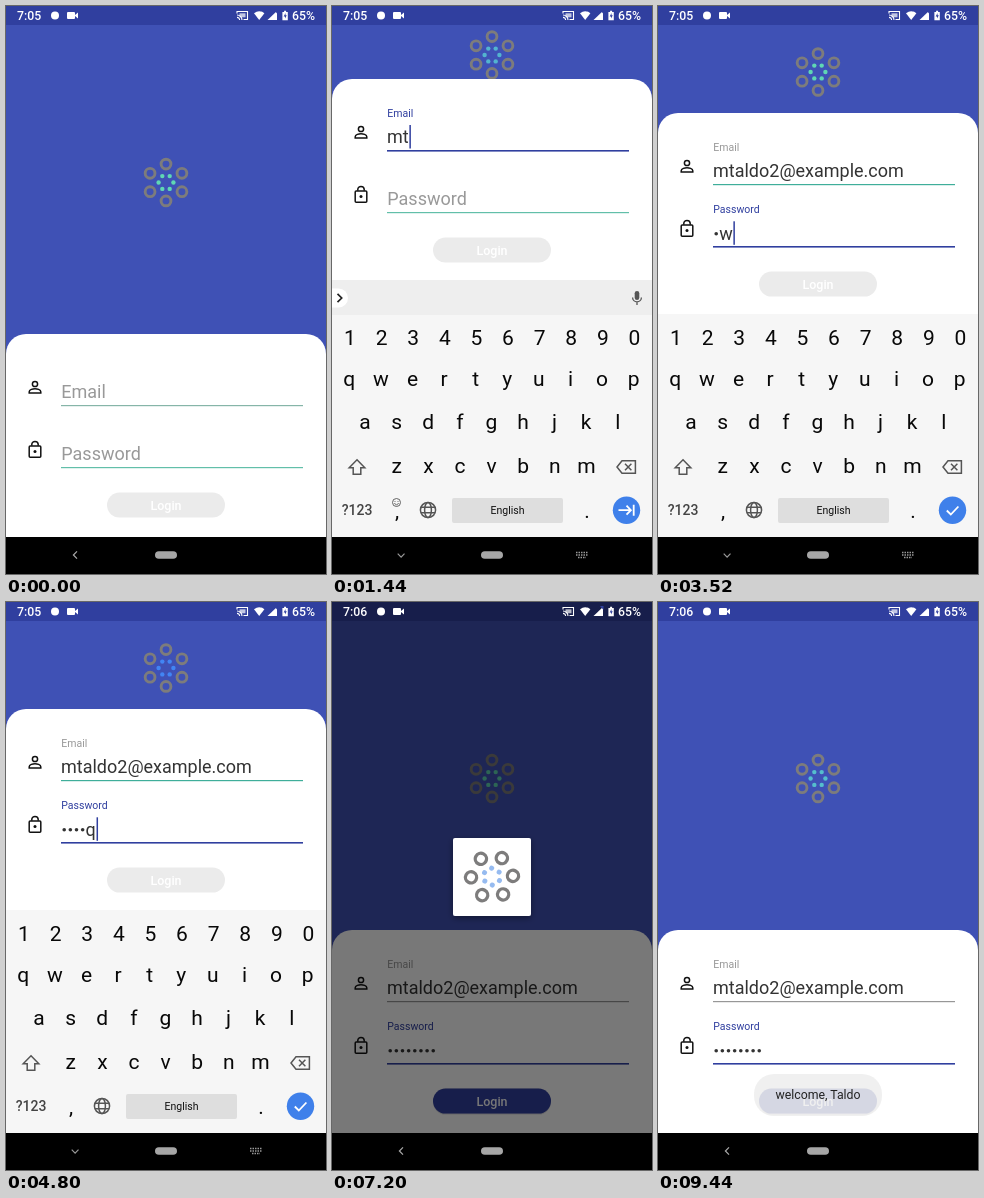
Animation, 320 px wide and 568 px high, one loop 9600 ms. Source, as an HTML page:

```html
<!DOCTYPE html>
<html lang="en">
<head>
<meta charset="utf-8">
<title>Login screen</title>
<style>
  html, body { margin: 0; width: 100%; height: 100%; overflow: hidden; background: #000; }
  svg { display: block; width: 320px; height: 568px; font-family: Roboto, "Noto Sans", sans-serif; }
  .mid { text-anchor: middle; }
  .bold { font-weight: 500; }
  .field { font-size: 18px; fill: #333; }
  .line { fill: none; stroke-linecap: butt; stroke-linejoin: miter; }
  .key { font-size: 21px; fill: #080808; text-anchor: middle; }
</style>
</head>
<body>
<svg viewBox="0 0 320 568">
  <defs>
    <g id="rings" fill="none" stroke="#7d7c7c" stroke-width="2.9"></g>
    <filter id="shadow" x="-30%" y="-30%" width="160%" height="170%">
      <feDropShadow dx="0" dy="2" stdDeviation="3" flood-opacity=".4"/>
    </filter>
    <filter id="lift" x="-10%" y="-20%" width="120%" height="160%">
      <feDropShadow dx="0" dy=".6" stdDeviation=".6" flood-opacity=".25"/>
    </filter>
  </defs>

  <rect width="320" height="568" fill="#3f51b5"/>
  <rect width="320" height="19" fill="#303f9f"/>
  <rect id="backing" y="270" width="320" height="298" fill="#f9f9f9"/>
  <g id="logo"><use href="#rings"/><g class="dots"></g></g>

  <g id="panel">
    <path d="M0 203V20A20 20 0 0 1 20 0H300A20 20 0 0 1 320 20V203Z" fill="#fff"/>
    <g class="line" stroke="#111" stroke-width="1.5">
      <circle cx="29" cy="50" r="2.6"/>
      <path d="M23.2 58.9v-1.2c0-2.2 3.9-3 5.8-3s5.8.8 5.8 3v1.2z"/>
      <rect x="23.2" y="112" width="11.6" height="11.2" rx="1"/>
      <path d="M25.8 111.8v-1.2a3.2 3.2 0 0 1 6.4 0v1.2"/>
    </g>
    <circle cx="29" cy="117.6" r="1.5" fill="#111"/>
    <text id="emailLabel" x="55.3">Email</text>
    <text id="email" class="field" x="55" y="64.3"></text>
    <rect id="emailLine" x="55" y="71" width="242"/>
    <text id="passLabel" x="55.3">Password</text>
    <g id="bullets" fill="#333"></g>
    <text id="lastChar" class="field" y="127"></text>
    <rect id="passLine" x="55" y="133" width="242"/>
    <rect id="caret" width="1.5" height="23.5" fill="#303f9f"/>
    <rect id="button" x="101" y="158.6" width="118" height="25" rx="12.5"/>
    <text class="mid bold" x="160" y="175.7" font-size="12.5" fill="#fff">Login</text>
  </g>

  <g id="toast">
    <rect x="96" y="472" width="128" height="42" rx="20" fill="#eee" fill-opacity=".87"/>
    <text class="mid" x="160" y="496.8" font-size="12.3" fill="#222">welcome, Taldo</text>
  </g>

  <rect id="scrim" width="320" height="532" fill="#000"/>

  <g fill="#fff">
    <text id="clock" class="bold" x="11" y="14" font-size="12.3"></text>
    <circle cx="49" cy="9.5" r="4"/>
    <rect x="61" y="6" width="8" height="7" rx="1"/>
    <path d="M69 9l3-2.5v6l-3-2.5z"/>
    <path d="M231 7.5v-2h10.5v8h-4" fill="none" stroke="#fff" stroke-width="1.1"/>
    <path d="M231 9a5 5 0 0 1 5 5M231 11.4a2.6 2.6 0 0 1 2.6 2.6" fill="none" stroke="#fff" stroke-width="1.1"/>
    <rect x="233.5" y="7.3" width="6" height="4" opacity=".7"/>
    <path d="M248 7.2q5.2-4 10.4 0l-5.2 6.8z"/>
    <path d="M271 5v9h-9.5z"/>
    <path d="M268 4h3.5v4z" fill="#303f9f"/>
    <path d="M276.4 6h1.7V4.7h2V6h1.7v8.2h-5.4z"/>
    <path d="M279.5 7l-1.8 3.4h1.3v2.2l1.8-3.4h-1.3z" fill="#303f9f"/>
    <text class="bold" x="286" y="14" font-size="12.3">65%</text>
  </g>

  <g id="dialog">
    <rect x="121" y="236" width="78" height="78" rx="2" fill="#fff" filter="url(#shadow)"/>
    <g id="spinner"><use href="#rings"/><g class="dots"></g></g>
  </g>

  <g id="keyboard">
    <rect y="308" width="320" height="262" fill="#f6f6f6"/>
    <g id="strip">
      <rect y="274" width="320" height="35" fill="#eee"/>
      <rect x="-8" y="282.5" width="24" height="19" rx="9.5" fill="#fff"/>
      <path class="line" d="M5.5 287.8l4.2 4.2-4.2 4.2" stroke="#222" stroke-width="1.7"/>
      <rect x="302.7" y="285" width="4.6" height="9" rx="2.3" fill="#555"/>
      <path class="line" d="M300.6 291.5a4.4 4.4 0 0 0 8.8 0M305 296v3" stroke="#555" stroke-width="1.3"/>
    </g>
    <g id="keys"></g>
    <g class="line" stroke="#555" stroke-width="1.5">
      <path d="M25 453.8l7.8 8h-4v6.4h-7.6v-6.4h-4z"/>
      <path d="M290 454.8h13.4v12.4H290l-5-6.2z"/>
      <path d="M293 457.8l6.4 6.4M299.4 457.8l-6.4 6.4"/>
      <circle cx="96" cy="504" r="7.6"/>
      <ellipse cx="96" cy="504" rx="3.4" ry="7.6"/>
      <path d="M89 501.2h14M89 506.8h14"/>
    </g>
    <text class="mid bold" x="25" y="509" font-size="14" fill="#444">?123</text>
    <g id="emoji" class="line" stroke="#555" stroke-width=".9">
      <circle cx="64.5" cy="496.5" r="4"/>
      <path d="M62.3 497.4q2.2 2.8 4.4 0M63 495v.9M66 495v.9"/>
    </g>
    <text class="key" x="65" y="512">,</text>
    <text class="key" x="255" y="512">.</text>
    <rect x="120" y="492" width="111" height="25" rx="2" fill="#dedede"/>
    <text class="mid" x="175.5" y="508" font-size="10.5" fill="#111">English</text>
    <circle cx="294.5" cy="504.2" r="13.7" fill="#3f80ea"/>
    <path id="enter" class="line" stroke="#fff" stroke-width="1.8"/>
  </g>
  <rect id="veil" y="270" width="320" height="261" fill="#f9f9f9"/>

  <rect id="navBar" y="531" width="320" height="37" fill="#000"/>
  <rect x="149" y="545.2" width="22" height="7.6" rx="3.8" fill="#fff" opacity=".65"/>
  <path id="back" class="line" d="M71 545.4l-3.6 3.6 3.6 3.6" stroke="#aaa" stroke-width="1.2"/>
  <g id="navKeys" class="line" stroke="#fff" stroke-opacity=".6">
    <path d="M65.7 547.7l3.4 3.4 3.4-3.4" stroke-width="1.2"/>
    <path d="M244 546.4h12M244 549h12M246 551.6h8" stroke-width="1.5" stroke-dasharray="1.5 1"/>
  </g>
</svg>

<script>
const LOOP = 9600, STEP = 160;
const EMAIL = "mtaldo2@example.com", PASSWORD = "qwerqwer";
const EMAIL_FOCUS = 320, KEYS_OPEN = 480, PASS_FOCUS = 2400, PLAIN_KEYS = 2720, KEYS_GONE = 6560;
const emailTyped = [[960, 1], [1280, 2], [1600, 3], [1920, EMAIL.length]];
const passTyped = [2880, 3360, 3840, 4320, 4640, 5040, 5360, 5680];
const REVEAL = 1500;
const BLUE = "#303f9f";
const DOT_COLORS = [
  [0, [95, 215, 180]], [240, [85, 190, 205]], [480, [150, 187, 240]],
  [720, [66, 133, 244]], [1120, [66, 133, 244]], [1680, [95, 215, 180]], [1840, [95, 215, 180]]
];

const $ = id => document.getElementById(id);
const set = (id, attrs) => { for (const k in attrs) $(id).setAttribute(k, attrs[k]); };
const show = (id, on) => set(id, { opacity: +on });
const mix = (a, b, p) => a + (b - a) * p;

function track(stops, t) {
  if (t <= stops[0][0]) return stops[0][1];
  for (let i = 1; i < stops.length; i++) {
    const [t0, a] = stops[i - 1], [t1, b] = stops[i];
    if (t < t1) return mix(a, b, (t - t0) / (t1 - t0));
  }
  return stops[stops.length - 1][1];
}

function dotColor(t) {
  t %= 1840;
  const part = c => Math.round(track(DOT_COLORS.map(([at, rgb]) => [at, rgb[c]]), t));
  return `rgb(${part(0)},${part(1)},${part(2)})`;
}

function hexagon(radius, start, r) {
  return Array.from({ length: 6 }, (_, i) => {
    const a = (start + i * 60) * Math.PI / 180;
    return `<circle cx="${radius * Math.cos(a)}" cy="${radius * Math.sin(a)}" r="${r}"/>`;
  }).join("");
}

function keyRow(chars, x, y) {
  return [...chars].map((c, i) => `<text class="key" x="${x + i * 31.6}" y="${y}">${c}</text>`).join("");
}

$("rings").innerHTML = hexagon(18.4, -90, 4.9);
document.querySelectorAll(".dots").forEach(g => g.innerHTML = hexagon(7.4, 0, 2.2));
$("keys").innerHTML = keyRow("1234567890", 18, 339.2) + keyRow("qwertyuiop", 17.3, 380) +
  keyRow("asdfghjkl", 33, 423.4) + keyRow("zxcvbnm", 64.8, 467);
$("bullets").innerHTML = [...PASSWORD].map((_, i) =>
  `<circle cx="${58.2 + i * 6.15}" cy="120.8" r="1.8"/>`).join("");
const bullets = [...$("bullets").children];

function floatLabel(id, p, restY, topY, fill) {
  set(id, { y: mix(restY, topY, p), "font-size": mix(18, 10.5, p), fill });
}

function underline(id, focused, idleFill) {
  set(id, { height: focused ? 1.6 : 1.2, fill: focused ? BLUE : idleFill });
}

function drawForm(t) {
  const top = t < KEYS_OPEN ? 328 : t < PLAIN_KEYS ? 73 : t < KEYS_GONE ? 107 : 328;
  const onEmail = t >= EMAIL_FOCUS && t < PASS_FOCUS, onPass = t >= PASS_FOCUS;
  set("panel", { transform: `translate(0 ${top})` });
  show("backing", top < 328);
  set("logo", { transform: `translate(160 ${(top + 25) / 2})` });

  floatLabel("emailLabel", track([[160, 0], [320, .4], [480, 1]], t), 64, 38, onEmail ? BLUE : "#999");
  const passFloat = track([[2400, 0], [2560, .38], [2720, 1]], t);
  floatLabel("passLabel", passFloat, 126.3, 100, passFloat === 1 ? BLUE : onPass ? "#777" : "#999");

  const typed = emailTyped.filter(([at]) => t >= at).pop();
  $("email").textContent = typed ? EMAIL.slice(0, typed[1]) : "";
  underline("emailLine", onEmail, t >= KEYS_GONE ? "#979797" : onPass ? "#3fae9a" : "#86b5a8");
  underline("passLine", onPass, "#62bfa9");

  const count = passTyped.filter(at => t >= at).length;
  const lastKey = passTyped[count - 1];
  const plain = count > 0 && t < lastKey + REVEAL;
  const hidden = count - plain;
  bullets.forEach((b, i) => b.setAttribute("opacity", +(i < hidden)));
  $("lastChar").textContent = plain ? PASSWORD[count - 1] : "";
  set("lastChar", { x: 55 + hidden * 6.15 });

  let since = -1, x = 55.7;
  if (onEmail) {
    since = t - (typed ? typed[0] : EMAIL_FOCUS);
    x += typed ? $("email").getComputedTextLength() : 0;
  } else if (onPass && t < 6240) {
    since = t - (lastKey || PASS_FOCUS);
    x += hidden * 6.15 + (plain ? $("lastChar").getComputedTextLength() : 0);
  }
  set("caret", { x, y: onEmail ? 46 : 108.3 });
  show("caret", since >= 0 && since % 1000 < 500);

  const ready = count === PASSWORD.length;
  set("button", { fill: ready ? BLUE : "#ebebeb", filter: ready ? "url(#lift)" : "none" });
}

function drawKeyboard(t) {
  const opening = t === KEYS_OPEN;
  const visible = t >= KEYS_OPEN && t < KEYS_GONE;
  const open = t > KEYS_OPEN && t < 6240;
  const slide = opening ? 36 : track([[6080, 0], [6240, 1], [6400, 40]], t);
  const fade = opening ? .38 : track([[6240, 0], [6400, .55]], t);
  set("keyboard", { transform: `translate(0 ${slide})`, opacity: +visible });
  // The veil fades the keys but stops above the navigation bar.
  set("veil", { y: 274 + slide, height: 257 - slide, opacity: visible ? fade : 0 });
  const early = t < PLAIN_KEYS;
  show("strip", early);
  show("emoji", early);
  set("enter", { d: early ? "M286.5 504.2h12M294.5 499.7l4.4 4.5-4.4 4.5M301.7 498.7v11" : "M288.8 504.5l4 4 7.6-8" });
  set("navBar", { opacity: opening ? .41 : 1 });
  show("back", !open && !opening);
  set("navKeys", { opacity: opening ? .6 : +open });
}

function render(t) {
  drawForm(t);
  drawKeyboard(t);
  $("clock").textContent = t < 6720 ? "7:05" : "7:06";

  const busy = track([[6720, 0], [6880, .5], [7040, 1], [8480, 1], [8640, .5], [8800, 0]], t);
  set("scrim", { opacity: busy * .53 });
  set("dialog", { opacity: busy });
  set("spinner", { transform: `translate(160 274.6) rotate(${28 + (t - 7200) * .09}) scale(1.14)` });
  set("toast", { opacity: track([[8640, 0], [8800, .5], [8960, 1]], t) });

  const [logoDots, spinDots] = document.querySelectorAll(".dots");
  logoDots.setAttribute("fill", dotColor(t));
  spinDots.setAttribute("fill", dotColor(t + 640));
}

const start = performance.now();
function tick() {
  const t = (performance.now() - start) % LOOP;
  render(Math.floor(t / STEP) * STEP);
  requestAnimationFrame(tick);
}
tick();
</script>
</body>
</html>
```
